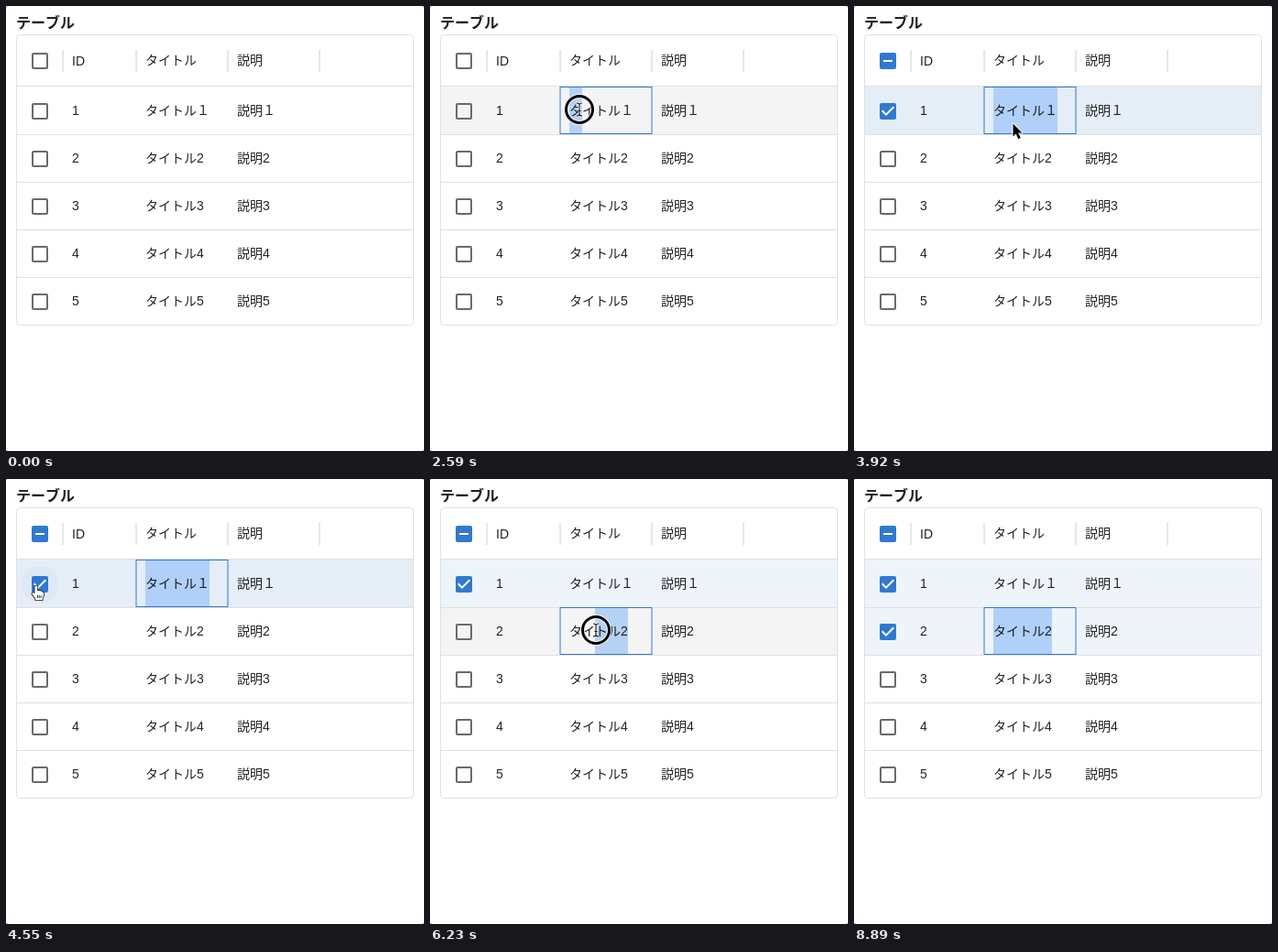
Write an HTML page with a canvas that moves like this. It is 456 px wide and 486 px high and loops after 9.1 s.

```html
<!DOCTYPE html>
<html lang="ja">
<head>
<meta charset="utf-8">
<title>テーブル</title>
<style>
  html, body { margin: 0; width: 100%; height: 100%; overflow: hidden; background: #fff; }
  canvas { display: block; }
</style>
</head>
<body>
<canvas id="stage" width="456" height="486"></canvas>
<script>
const ctx = document.getElementById('stage').getContext('2d');
const LOOP = 9100, STEP = 70;
const FONT = '"Liberation Sans", "Noto Sans CJK JP", "Noto Sans CJK", sans-serif';
const BLUE = '#3079d1', LINE = '#e0e0e0', INK = 'rgba(0,0,0,.87)';
const ROW_TOP = 88, ROW_H = 52, BOX_X = 37, TITLE_X = 152, DESC_X = 252, CHAR = 14;
const SUFFIX = ['１', '2', '3', '4', '5'];
const SHOW = 490, FOCUS = 1890, HIDE = 8890;

const rowTop = row => ROW_TOP + row * ROW_H;
const textStart = row => ({ x: TITLE_X + 3, y: rowTop(row) + 25 });
const textEnd = row => ({ x: TITLE_X + 5 * CHAR + 4, y: rowTop(row) + 25 });
const tickBox = row => ({ x: BOX_X - 4, y: rowTop(row) + 28 });

// Each row is dragged once: the first left to right, the second back from its end.
const DRAGS = [0, 1].map(row => ({
  row, anchor: row * 5, down: 2240 + row * 3500, up: 3360 + row * 3570,
}));

const linear = k => k;
const easeOut = k => 1 - (1 - k) ** 2.5;
const move = (start, end, to, ease = easeOut) => ({ start, end, to, ease });
const MOVES = [
  move(420, 560, { x: 229, y: 410 }),
  move(630, 1330, { x: 131, y: 91 }),
  move(1330, 1610, { x: 152, y: 110 }),
  move(1820, 2100, textStart(0)),
  move(2520, 3150, textEnd(0), linear),
  move(3850, 4270, { x: 80, y: 155 }),
  move(4340, 4550, tickBox(0)),
  move(4760, 4970, { x: 46, y: 109 }),
  move(5040, 5390, { x: 212, y: 162 }),
  move(5460, 5880, textEnd(1)),
  move(6020, 6650, textStart(1)),
  move(7280, 7490, tickBox(1)),
  move(8120, 8330, { x: 246, y: 386 }),
  move(8470, 8890, { x: 235, y: 490 }, linear),
];

function pointerAt(t) {
  let x = 226, y = 450;
  for (const { start, end, to, ease } of MOVES) {
    const k = ease(Math.min(1, Math.max(0, (t - start) / (end - start))));
    x += (to.x - x) * k;
    y += (to.y - y) * k;
  }
  return { x: Math.round(x), y: Math.round(y) };
}

function rect(x, y, w, h, color) {
  ctx.fillStyle = color;
  ctx.fillRect(x, y, w, h);
}

function rounded(x, y, w, h, r) {
  ctx.beginPath();
  ctx.roundRect(x, y, w, h, r);
}

function disc(x, y, r, color) {
  ctx.beginPath();
  ctx.arc(x, y, r, 0, 7);
  ctx.fillStyle = color;
  ctx.fill();
}

function text(str, x, y, font = '350 14px ') {
  ctx.font = font + FONT;
  ctx.fillStyle = INK;
  ctx.fillText(str, x, y);
}

function checkbox(y, state) {
  ctx.lineWidth = 2;
  if (!state) {
    rounded(BOX_X - 8, y - 8, 16, 16, 1);
    ctx.strokeStyle = '#6a6a6a';
    ctx.stroke();
    return;
  }
  rounded(BOX_X - 9, y - 9, 18, 18, 2);
  ctx.fillStyle = BLUE;
  ctx.fill();
  if (state === 'some') return rect(BOX_X - 5, y - 1, 10, 2, '#fff');
  ctx.beginPath();
  ctx.moveTo(BOX_X - 6.3, y - .7);
  ctx.lineTo(BOX_X - 2, y + 3.6);
  ctx.lineTo(BOX_X + 6.3, y - 4.7);
  ctx.strokeStyle = '#fff';
  ctx.stroke();
}

const arrowShape = new Path2D('M.5 .5V14.5L3.7 11.6L6.2 17.2L8.8 16L6.3 10.6H10.5Z');
const beamShape = new Path2D('M-3-7Q0-7 0-5Q0-7 3-7M0-5V5M-3 7Q0 7 0 5Q0 7 3 7M-1.5 1.5H1.5');
const handShape = new Path2D('M-1.6 9V1.6Q-1.6.5-.2.5Q1.3.5 1.3 1.7V6.2' +
  'Q3.6 5 4 6.6Q6 5.8 6.3 7.4Q8 7 8 9V11.5L6.7 14V16.3H-.8V14.5L-4.5 9.8Q-4.6 7.6-3 8.2Z');
const fingers = new Path2D('M1.5 11V14M3.3 11V14M5.1 11V14');

function strokeShape(shape, color, width) {
  ctx.strokeStyle = color;
  ctx.lineWidth = width;
  ctx.stroke(shape);
}

function drawPointer({ x, y }, kind, pressed) {
  ctx.save();
  ctx.translate(x, y);
  ctx.lineJoin = 'round';
  if (pressed) {
    const ring = new Path2D();
    ring.arc(0, 0, 14.5, 0, 7);
    strokeShape(ring, 'rgba(255,255,255,.8)', 5);
    strokeShape(ring, '#000', 3);
  }
  if (kind === 'beam') {
    strokeShape(beamShape, '#fff', 3);
    strokeShape(beamShape, '#111', 1.1);
  } else if (kind === 'hand') {
    strokeShape(handShape, '#111', 1.6);
    ctx.fillStyle = '#fff';
    ctx.fill(handShape);
    strokeShape(fingers, '#111', .8);
  } else {
    strokeShape(arrowShape, '#fff', 2);
    ctx.fillStyle = '#000';
    ctx.fill(arrowShape);
  }
  ctx.restore();
}

function pointerKind({ x, y }, hover, pressed) {
  if (pressed) return 'beam';
  if (hover < 0) return 'arrow';
  const mid = rowTop(hover) + 27;
  if (Math.hypot(x - BOX_X, y - mid) < 20) return 'hand';
  const onText = (x >= TITLE_X && x < TITLE_X + 68) || (x >= DESC_X && x < DESC_X + 36);
  return onText && Math.abs(y - mid) < 9 ? 'beam' : 'arrow';
}

function drawSelection({ row, anchor, up }, t, checked) {
  const { x } = pointerAt(Math.min(t, up));
  const head = Math.min(5, Math.max(0, Math.round((x - TITLE_X) / CHAR)));
  const width = row ? 4 * CHAR + 8 : 5 * CHAR;
  const edge = i => TITLE_X + Math.min(i * CHAR, width);
  const from = edge(Math.min(head, anchor)), to = edge(Math.max(head, anchor));
  rect(from, rowTop(row) + 1, to - from, ROW_H - 2, checked ? '#b0d0fa' : '#b5d2f5');
}

function draw(t) {
  const pointer = pointerAt(t);
  const visible = t >= SHOW && t < HIDE;
  const drag = DRAGS.filter(d => t >= d.down).pop();
  const pressed = !!drag && t < drag.up;
  const over = Math.floor((pointer.y - ROW_TOP) / ROW_H);
  const hover = visible && t >= FOCUS && over >= 0 && over < 5 ? over : -1;
  const kind = pointerKind(pointer, hover, pressed);
  const isChecked = row => DRAGS.some(d => d.row === row && t >= d.up);

  rect(0, 0, 456, 486, '#777');
  rounded(0, 0, 456, 486, 2);
  ctx.fillStyle = '#fff';
  ctx.fill();
  text('テーブル', 11, 24, 'bold 16px ');

  text('ID', 72, 65);
  text('タイトル', TITLE_X, 64);
  text('説明', DESC_X, 64);
  for (let x = 61; x < 400; x += x < 100 ? 80 : 100) rect(x, 48, 2, 24, '#e6e6e6');
  checkbox(60, isChecked(0) && 'some');

  SUFFIX.forEach((suffix, row) => {
    const top = rowTop(row), mid = top + 27, checked = isChecked(row);
    const hot = row === hover;
    if (checked) rect(12, top, 432, ROW_H, hot ? '#e5eef7' : '#eff4fb');
    else if (hot) rect(12, top, 432, ROW_H, '#f4f4f4');
    if (hot && kind === 'hand') disc(BOX_X, mid, 20, checked ? '#dde8f5' : '#ebeff4');
    checkbox(mid, checked && 'all');
    if (drag && drag.row === row) drawSelection(drag, t, checked);
    text(String(row + 1), 72, top + 31);
    text('タイトル' + suffix, TITLE_X, top + 31);
    text('説明' + suffix, DESC_X, top + 31);
  });

  rect(12, 87, 432, 1, LINE);
  for (let row = 1; row < 5; row++) rect(12, rowTop(row), 432, 1, LINE);
  rounded(11.5, 31.5, 433, 317, 4);
  ctx.strokeStyle = LINE;
  ctx.lineWidth = 1;
  ctx.stroke();

  if (drag) {
    ctx.strokeStyle = BLUE;
    ctx.strokeRect(142, rowTop(drag.row) + .5, 100, 51);
  }
  if (visible) drawPointer(pointer, kind, pressed);
}

function tick() {
  const t = performance.now() % LOOP;
  draw(Math.floor(t / STEP) * STEP);
  requestAnimationFrame(tick);
}
tick();
</script>
</body>
</html>
```
